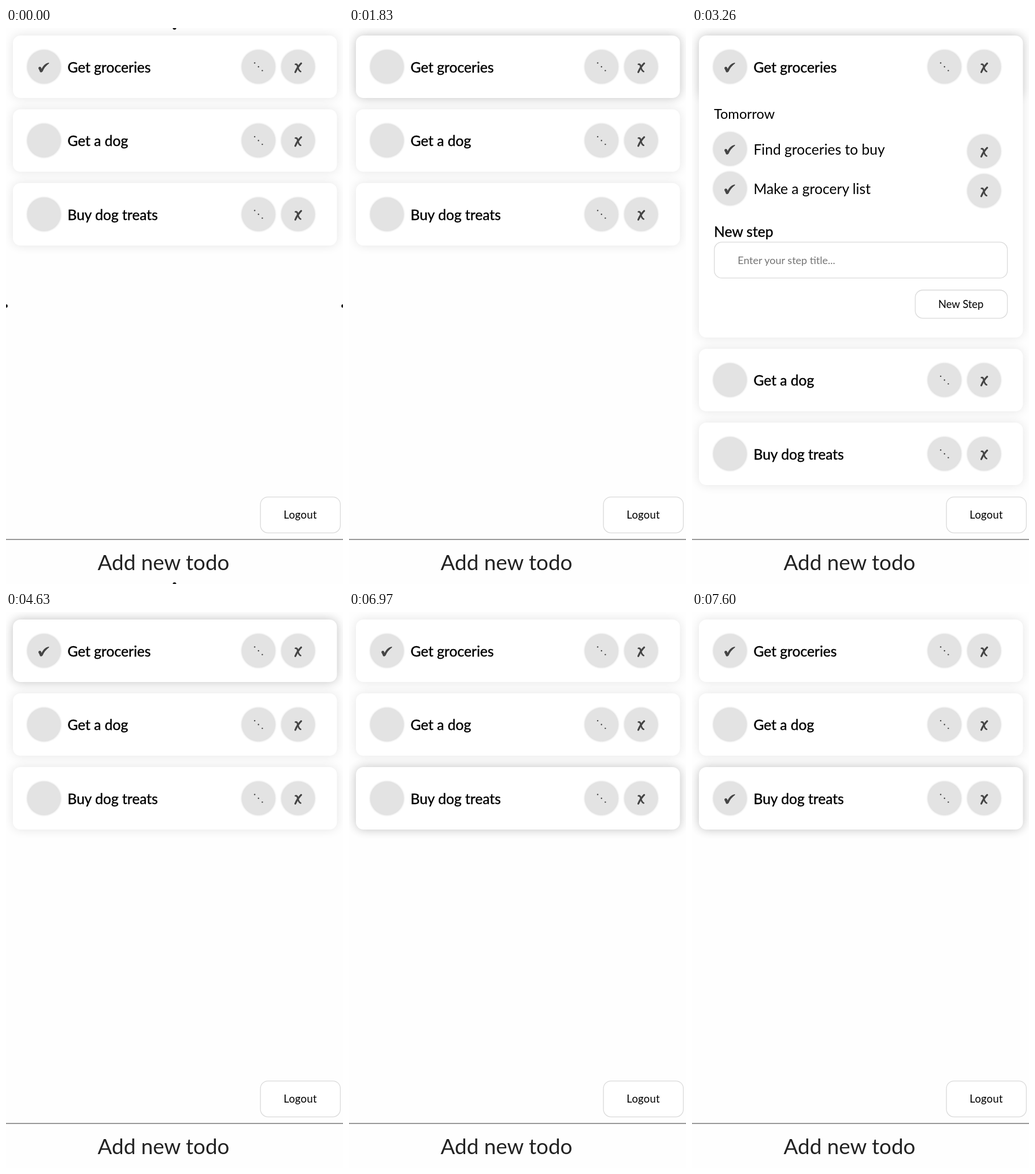
An HTML page for the animation above (8 s loop, 583 by 961 pixels).

```html
<!DOCTYPE html>
<html lang="en">
<head>
<meta charset="utf-8">
<title>Todo list</title>
<style>
  html, body { margin: 0; width: 100%; height: 100%; overflow: hidden; background: #fefefe; }
  svg { display: block; width: 583px; height: 961px; }
  text { font-family: Raleway, Lato, sans-serif; font-size: 24.6px; fill: #000; }
  .bold { stroke: #000; stroke-width: .4px; }
  .small { font-size: 18.4px; }
  .hint { font-size: 18px; fill: #757575; }
  .big { font-size: 36.8px; fill: #222; }
  .day { font-size: 23.5px; }
  .box { fill: #fff; stroke: #dadada; stroke-width: 1.3; }
</style>
</head>
<body>
<svg viewBox="0 0 583 961">
  <defs>
    <filter id="soft" filterUnits="userSpaceOnUse" x="-60" y="-60" width="703" height="1081">
      <feGaussianBlur stdDeviation="9"/>
    </filter>
    <filter id="rim" x="-20%" y="-20%" width="140%" height="140%">
      <feGaussianBlur stdDeviation="1.6"/>
    </filter>
    <g id="disc">
      <circle r="29.2" fill="#000" opacity=".17" filter="url(#rim)"/>
      <circle r="28.4" fill="#e3e3e3"/>
    </g>
    <path id="check" fill="#444" d="M-9.6 3C-10 .8-7.4-.6-6 .5Q-5-.2-4.2 3.7Q0-5 7-6.8Q9.8-7.3 8.5-5.5Q1-.2-2.4 8.3Q-4.5 10.6-6.8 9.1Q-8 5.6-9.6 3Z"/>
    <g id="cross" fill="none" stroke="#444" stroke-linecap="round">
      <path stroke-width="3.1" d="M5.3-5.8Q-1.5 1-4.8 9.3"/>
      <path stroke-width="2.7" d="M-4.6-4.3Q-1.8-5-.9-1.5Q.8 7 4.3 8.2"/>
    </g>
    <g id="dots" fill="#444">
      <circle cx="-6.6" cy="-6.6" r="1.2"/><circle r="1.2"/><circle cx="6.6" cy="6.6" r="1.2"/>
    </g>
  </defs>
  <g id="list"></g>
  <rect class="box" x="440.2" y="810.6" width="138.2" height="62" rx="13"/>
  <text class="small" x="509.2" y="848" text-anchor="middle" letter-spacing=".3">Logout</text>
  <path d="M0 884H583" stroke="#777" stroke-width="1.5"/>
  <text class="big" x="272.5" y="937" text-anchor="middle">Add new todo</text>
  <g id="handles" fill="#222">
    <circle cy="480.5" r="3"/><circle cx="583" cy="480.5" r="3"/>
    <circle cx="291.5" r="3"/><circle cx="291.5" cy="961" r="3"/>
  </g>
</svg>
<script>
const LOOP = 8000, HEAD = 108, GAP = 19.5;
const list = document.getElementById('list');
const handles = document.getElementById('handles');

const todos = [
  { title: 'Get groceries', day: 'Tomorrow', steps: ['Find groceries to buy', 'Make a grocery list'] },
  { title: 'Get a dog', day: '', steps: [] },
  { title: 'Buy dog treats', day: 'tomorrow', steps: [] }
];

// hover and open are todo indices, -1 for none
const timeline = [
  { at: 0, hover: -1, open: -1, done: [0], handles: true },
  { at: 60, hover: 0, open: -1, done: [0] },
  { at: 1830, hover: 0, open: -1, done: [] },
  { at: 2460, hover: 0, open: -1, done: [0] },
  { at: 3260, hover: 0, open: 0, done: [0] },
  { at: 4630, hover: 0, open: -1, done: [0] },
  { at: 6400, hover: 2, open: 2, done: [0] },
  { at: 6970, hover: 2, open: -1, done: [0] },
  { at: 7600, hover: 2, open: -1, done: [0, 2] }
];

const text = (x, y, string, style = '') => `<text class="${style}" x="${x}" y="${y}">${string}</text>`;
const button = (x, y, icon) =>
  `<g transform="translate(${x} ${y})"><use href="#disc"/>${icon ? `<use href="#${icon}"/>` : ''}</g>`;
const panel = (y, height, attrs) =>
  `<rect x="12" y="${y}" width="560.5" height="${height}" rx="13" ${attrs}/>`;
const shadow = (y, height, opacity) => panel(y, height, `opacity="${opacity}" filter="url(#soft)"`);
const box = (x, y, width, height) =>
  `<rect class="box" x="${x}" y="${y}" width="${width}" height="${height}" rx="13"/>`;

function details({ day, steps }) {
  const shift = steps.length ? 0 : -136.7;
  const rows = steps.map((step, i) => {
    const y = 196 + i * 68.5;
    return button(65.7, y, 'check') + text(106.5, y + 9.5, step) + button(505.3, y + 4, 'cross');
  });
  return text(38, 144, day, 'day') + rows.join('') +
    `<g transform="translate(0 ${shift})">` +
    text(38, 347.5, 'New step', 'bold') +
    box(38.6, 357.2, 507, 62) + text(79, 394.5, 'Enter your step title...', 'hint') +
    box(386.2, 440, 159.4, 48.6) + text(426, 471, 'New Step', 'small') + '</g>';
}

function card(todo, y, height, hover, open, done) {
  return shadow(y, height, .1) + (hover ? shadow(y, HEAD, .14) : '') +
    panel(y, height, 'fill="#fff"') +
    `<g transform="translate(0 ${y})">` +
    button(65.7, 54, done && 'check') + text(106.5, 63.7, todo.title, 'bold') +
    button(436.8, 54, 'dots') + button(505.3, 54, 'cross') +
    (open ? details(todo) : '') + '</g>';
}

function draw(state) {
  let y = 13, markup = '';
  todos.forEach((todo, i) => {
    const open = state.open === i;
    const height = !open ? HEAD : todo.steps.length ? 522 : 385.5;
    markup += card(todo, y, height, state.hover === i, open, state.done.includes(i));
    y += height + GAP;
  });
  list.innerHTML = markup;
  handles.style.display = state.handles ? '' : 'none';
}

let shown;
function tick() {
  const time = performance.now() % LOOP;
  const state = timeline.findLast(entry => entry.at <= time);
  if (state !== shown) draw(shown = state);
  requestAnimationFrame(tick);
}
tick();
</script>
</body>
</html>
```
